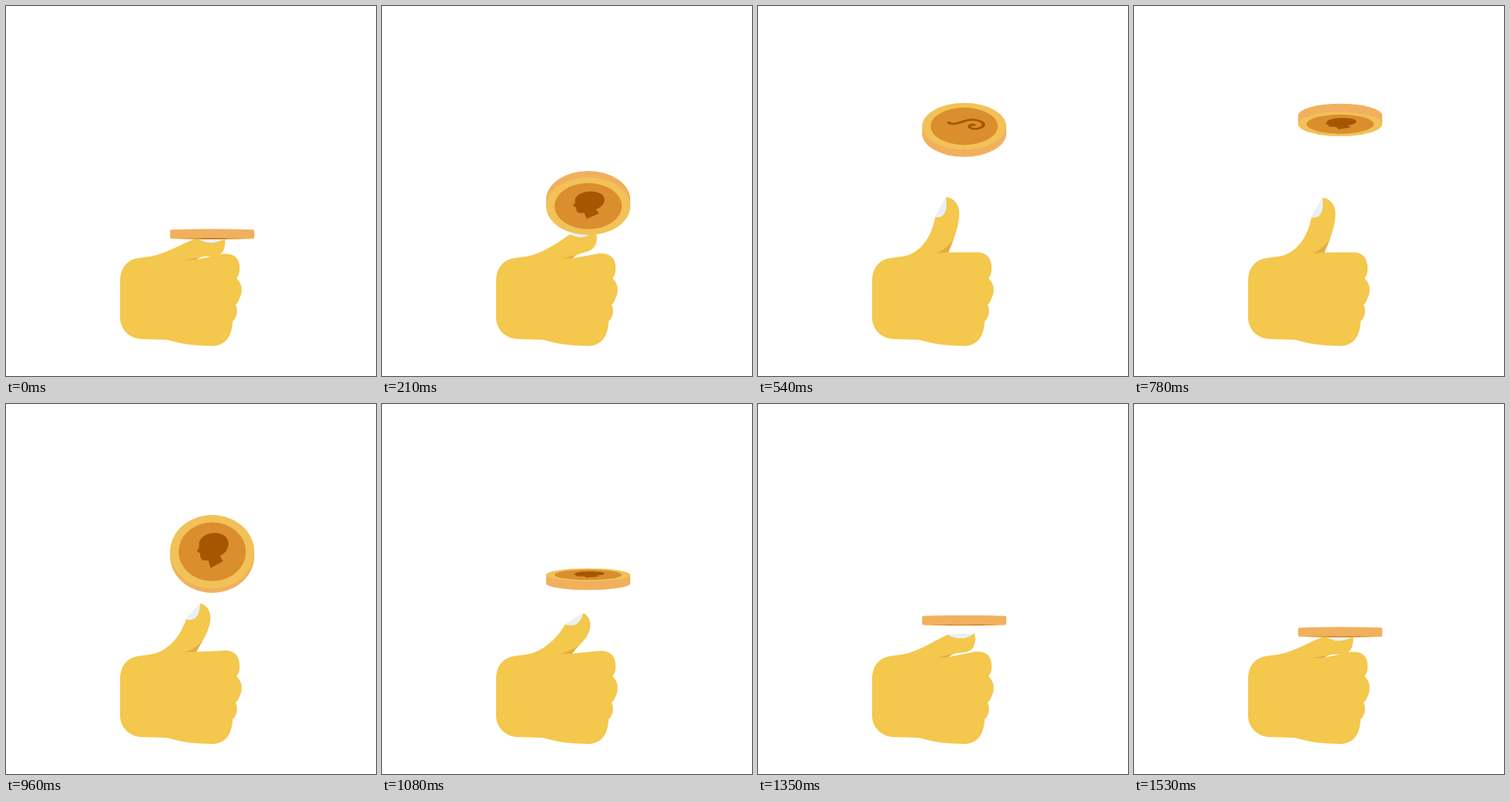
An HTML page with a canvas for the animation above (1650 ms loop, 480 by 480 pixels).

```html
<!DOCTYPE html>
<html lang="en">
<head>
<meta charset="utf-8">
<title>Coin toss</title>
<style>
html, body { margin: 0; width: 100%; height: 100%; overflow: hidden; background: #fff; }
canvas { display: block; width: 480px; height: 480px; }
</style>
</head>
<body>
<canvas id="stage" width="480" height="480"></canvas>
<script>
const ctx = document.getElementById('stage').getContext('2d');
const LOOP = 1650, STEP = 30, LAST = 1530;
const SKIN = '#f4c74d', SHADE = '#e2ad40', NAIL = '#e8f1fa';
const EDGE = '#f1b05d', RIM = '#f2c158', FACE = '#da8e2e', MARK = '#a65500';
const CX = 267.5, RADIUS = 54.6, DEPTH = 5.7;

// Coin centre: time, y
const flight = [[0, 296], [210, 255.5], [540, 160.75], [780, 147.75], [960, 194.5], [1200, 255.3], [LAST, 296]];

// Thumb outline: side, nail base, tip, two tip controls, pad,
// two underside controls, crease, two nail controls
const down = [[229, 308], [247, 301.5], [284, 302], [285, 307], [284, 314], [281, 319], [274, 330], [258, 320], [247, 329], [272, 308], [263, 310]];
const up = [[224, 305], [230, 274], [244, 248], [255, 249], [262, 259], [261, 271], [260, 289], [253, 305], [247, 319.5], [246, 263], [243, 276]];

const head = new Path2D('M-17-13C-15-23-5-28 3-28C15-28 22-20 21-11C21-3 15 4 10 6L14 14L-2 24L-5 13C-8 13-13 13-14 11C-16 8-15 4-16 2L-20-1L-17-6Z');
const swirl = new Path2D('M-20-9C-17-2-8-7 0-12C11-19 26-13 25-3C23 7 10 9 7 2C6-3 10-5 13-3');

const mix = (a, b, k) => a + (b - a) * k;

// Symmetric ease from 0 to 1 between two times
function ease(t, from, to, power = 2.2) {
  const x = Math.min(1, Math.max(0, (t - from) / (to - from)));
  return x ** power / (x ** power + (1 - x) ** power);
}

// Smooth curve through key points, at rest at both ends
function through(keys, t) {
  let i = 0;
  while (i < keys.length - 2 && t > keys[i + 1][0]) i++;
  const slope = j => {
    const a = keys[j - 1], b = keys[j + 1];
    return a && b ? (b[1] - a[1]) / (b[0] - a[0]) : 0;
  };
  const [t0, v0] = keys[i], [t1, v1] = keys[i + 1];
  const d = t1 - t0, s = (t - t0) / d, r = 1 - s;
  return mix(v0, v1, s * s * (3 - 2 * s)) + d * s * r * (r * slope(i) - s * slope(i + 1));
}

function fill(path, color) {
  ctx.fillStyle = typeof path === 'string' ? color : color;
  ctx.fill(path);
}

function drawHand(t) {
  const raise = ease(t, 60, 540, 1.8) - ease(t, 720, 1500, 1.7);
  const [side, base, tip, t1, t2, pad, r1, r2, crease, n1, n2] =
    down.map(([x, y], i) => [mix(x, up[i][0], raise), mix(y, up[i][1], raise)]);
  const [cx, cy] = crease;

  const thumb = new Path2D(`M190 324.5C207 321 ${side} ${base}L${tip}C${t1} ${t2} ${pad}C${r1} ${r2} ${crease}L230 340L190 340Z`);
  fill(thumb, SKIN);

  ctx.save();
  ctx.clip(thumb);
  fill(new Path2D(`M${r1}L${cx + 20} ${cy + 4}L${cx - 18} ${cy + 2}Q${cx + 5} ${cy - 6} ${r1}Z`), SHADE);
  ctx.restore();

  fill(new Path2D(`M${tip}C${n1} ${n2} ${base}Z`), NAIL);

  const top = mix(321.5, 319.5, raise);
  fill(new Path2D(`M148 358C148 340 157 329 172 327L190 324.5L${cx - 18} ${cy + 1}L${crease}L282 ${top}
    C296 ${top - 1} 304 327 303 342Q303 349 299 353C306 359 308 371 303 379Q302 384 298 387
    C301 395 300 404 294 409C293 429 285 440 268 441C245 441 225 438 209 433L175 432C160 431 149 420 148 406Z`), SKIN);
}

function disc(y, r, squash, color) {
  const path = new Path2D();
  path.ellipse(CX, y, r, r * squash, 0, 0, 2 * Math.PI);
  fill(path, color);
}

function drawCoin(t) {
  // One full turn on the way up, half a turn on the way down
  const turn = 360 * ease(t, 0, 735) + 180 * ease(t, 635, 1202) + 1;
  const angle = turn * Math.PI / 180, y = through(flight, t);
  const heads = Math.sin(angle) > 0, squash = Math.abs(Math.sin(angle));
  const shift = DEPTH * Math.cos(angle) * (heads ? 1 : -1), depth = Math.abs(shift);

  disc(y - shift, RADIUS, squash, EDGE);
  const band = new Path2D();
  band.roundRect(CX - RADIUS, y - depth, 2 * RADIUS, 2 * depth, 2 * (1 - squash));
  fill(band, EDGE);
  disc(y + shift, RADIUS, squash, RIM);
  disc(y + shift, RADIUS * .8, squash, FACE);

  ctx.save();
  ctx.translate(CX, y + shift);
  ctx.scale(1, squash);
  if (heads) {
    fill(head, MARK);
  } else {
    ctx.strokeStyle = MARK;
    ctx.lineWidth = 4.5;
    ctx.lineCap = 'round';
    ctx.stroke(swirl);
  }
  ctx.restore();
}

function frame() {
  const t = Math.min(LAST, Math.floor(performance.now() % LOOP / STEP) * STEP);
  ctx.clearRect(0, 0, 480, 480);
  drawHand(t);
  drawCoin(t);
  requestAnimationFrame(frame);
}
frame();
</script>
</body>
</html>
```
